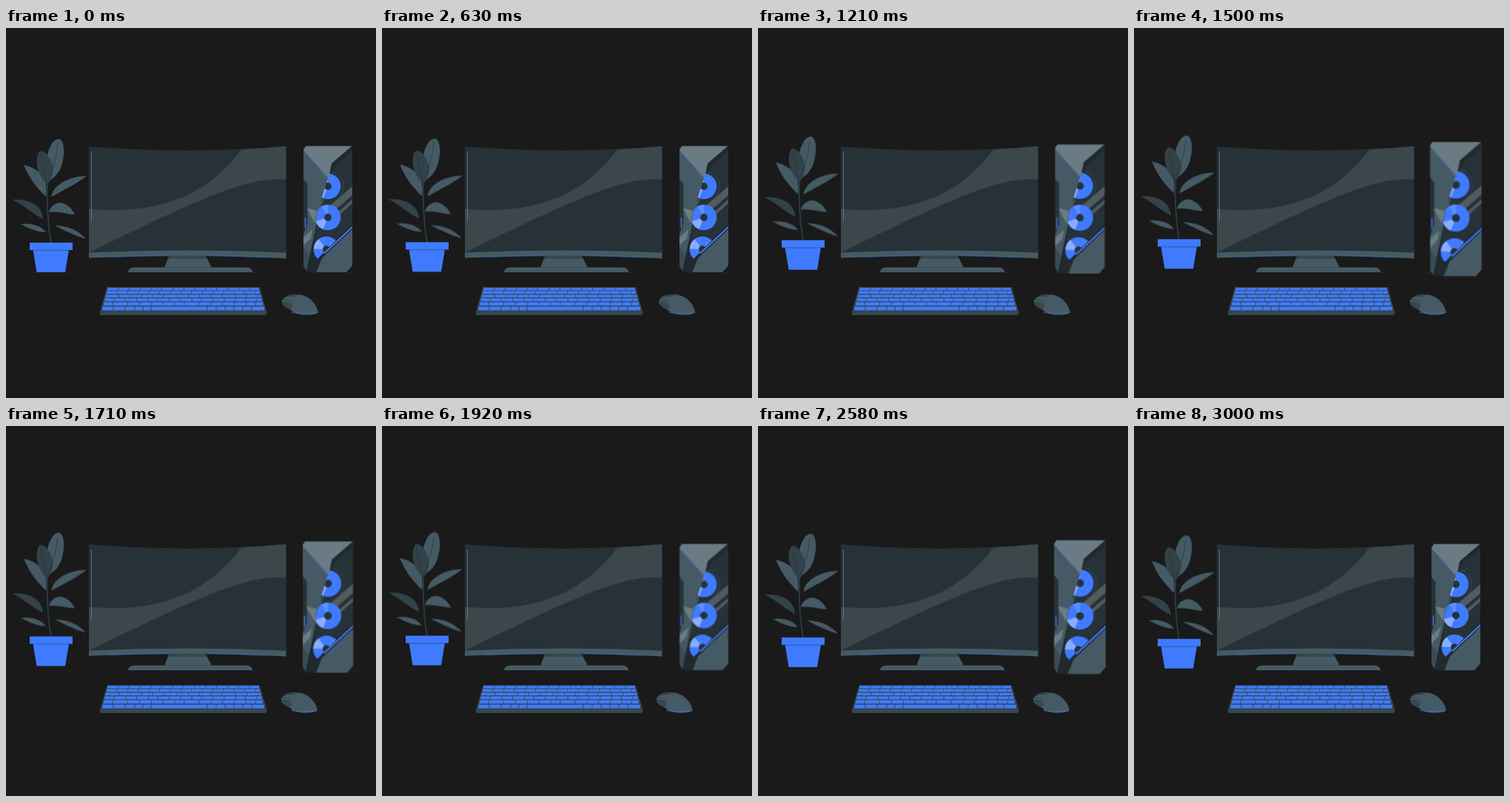
An HTML page without scripts for the animation above (3.04 s loop, 500 px wide and 500 px high).

```html
<!DOCTYPE html>
<html lang="en">
<head>
<meta charset="utf-8">
<title>Desk setup</title>
<style>
  html, body { margin: 0; width: 100%; height: 100%; overflow: hidden; background: #1a1a1a; }
  svg { display: block; width: 100vw; height: 100vh; }
  .blue { fill: #407bff; }
  .slate { fill: #455a64; }
  .mid { fill: #37474f; }
  .dark { fill: #263238; }
  .deep { fill: #20292e; }
  .glare { fill: #fff; opacity: .1; }
  .line { fill: none; stroke: #263238; stroke-width: .6; }
  .glow { fill: none; stroke: #407bff; }
  .keys path { fill: none; stroke: #407bff; }

  .plant { animation: rise 3.04s linear infinite; }
  .mouse { animation: nudge 3.04s linear infinite; }
  .tower { animation: pulse 3.04s ease-in-out infinite; transform-origin: 435px 244.7px; }

  @keyframes rise {
    0%, 16.45% { transform: translateY(0); }
    65.79% { transform: translateY(-7px); }
    100% { transform: translateY(-2.15px); }
  }
  @keyframes nudge {
    0% { transform: translateX(0); }
    18% { transform: translateX(1.6px); }
    31.6%, 49.3% { transform: translateX(0); }
    66% { transform: translateX(-2.6px); }
    98.7%, 100% { transform: translateX(0); }
  }
  @keyframes pulse {
    0%, 32.89%, 65.79%, 98.68%, 100% { transform: scale(1); }
    49.34%, 82.24% { transform: scale(1.066); }
  }
</style>
</head>
<body>
<svg viewBox="0 0 500 500" xmlns="http://www.w3.org/2000/svg">
  <defs>
    <clipPath id="glass"><path d="M439 190 470 160V266L426 309 414 318V290L418 262 424 238Z"/></clipPath>
    <clipPath id="shell"><path d="M405.500 159.500H468V321L460 330H407L402 322V164Z"/></clipPath>
    <g id="fan">
      <circle r="17.300" class="blue"/>
      <g fill="#fff">
        <path d="M0 0-16.500 5.200A17.300 17.300 0 0 0-6.500 16Z" opacity=".38"/>
        <path d="M0 0-8.600-15A17.300 17.300 0 0 1 0-17.300Z" opacity=".15"/>
      </g>
      <circle r="5" class="dark"/>
    </g>
  </defs>

  <path d="M20 330.300H480" stroke="#263238" stroke-width=".5" opacity=".7"/>

  <g class="plant">
    <path d="M61 291C57 268 55 240 56 205" fill="none" stroke="#2b3a41" stroke-width="2"/>
    <g class="slate">
      <path d="M55 208C50 186 57 153 70 150C80 148 81 176 72 193C68 200 62 205 55 208Z"/>
      <path d="M24 185C34 187 47 193 52 204C55 212 55 220 54 228C45 219 33 207 24 185Z"/>
      <path d="M109 200C92 200 76 206 67 216C63 221 61 226 62 228C77 219 92 213 109 200Z"/>
      <path d="M58 249C60 240 68 235 76 236.500C84 239 90 245 93 252C82 252 70 247 58 249Z"/>
      <path d="M20 265C32 263 46 266 54 276C42 276 31 271 20 265Z"/>
      <path d="M66 267C82 267 98 273 108 285C94 281 82 275 66 267Z"/>
    </g>
    <g fill="#324249">
      <path d="M56 211C44 203 37 178 45 167C50 163 61 175 63.500 188C64 199 60 207 56 211Z"/>
      <path d="M9 232C24 231 38 235 45 244C49 250 50 255 50 258C37 252 26 241 9 232Z"/>
    </g>
    <path class="line" d="M57 205Q68 181 70 156M55 208Q49 190 47 170"/>
    <path class="blue" d="M32 290H90V300H32ZM36.500 300H85L80 330H41.500Z"/>
    <path d="M36.500 300.300H85" stroke="#263238" stroke-width=".7" opacity=".7"/>
  </g>

  <g>
    <path class="mid" d="M221 306H269L278 324H214Z"/>
    <path class="slate" d="M219 312H271.500L278 324H214Z"/>
    <path class="slate" d="M164.500 330Q166 323.500 173 323.500H325Q332 323.500 333.500 330Z"/>
    <path class="line" d="M214 323.500H278" opacity=".6"/>
    <path class="slate" d="M112 300H378.500V311.500Q245 304 112 310.800Z"/>
    <path class="glow" stroke-width=".8" opacity=".75" d="M140 309.400Q180 308 220 307.700M272 307.700Q310 308 350 309.800"/>
    <path class="dark" d="M112 160Q245 171 378.500 159.500V303.500Q245 297.500 112 303.500Z"/>
    <path class="glare" d="M112 244.500C198 252 268 232 318 164.200Q350 162.500 378.500 159.500V205C322 199.500 244 240 112 303.500Z"/>
    <path d="M115.500 167V261" stroke="#84929a" stroke-width=".6"/>
  </g>

  <g>
    <path class="mid" d="M127 383H352.500V386Q352 388 350 388H129Q127 388 127 386Z"/>
    <path d="M136.500 350H342.500L352.500 384H127Z" fill="#34474f"/>
    <g class="keys">
      <path d="M137 352.800H342" stroke-width="3.200" stroke-dasharray="14 .8"/>
      <path d="M136 357.400H343" stroke-width="3.600" stroke-dasharray="13.600 .8"/>
      <path d="M134.500 362.200H344.500" stroke-width="3.600" stroke-dasharray="18 .8 14.200 .8 14.200 .8 14.200 .8 14.200 .8"/>
      <path d="M133.500 367.200H345.500" stroke-width="4" stroke-dasharray="12 .9 14.500 .9 14.500 .9 14.500 .9"/>
      <path d="M132 372.800H347" stroke-width="4.400" stroke-dasharray="12 .9 19 .9 15 .9 15 .9 15 .9 15 .9"/>
      <path d="M130.500 379H349" stroke-width="4.800" stroke-dasharray="14 1 15 1 12 1 10 1 10 1 75 1 11 1 11 1 11 1 11 1 11 1 20"/>
    </g>
  </g>

  <g class="mouse">
    <path class="slate" d="M373 369C375 362 384 359.500 395 360C410 361.500 420 373 421.800 384C421 387 412 388 403 387.700C393 387 387 384 384 380C379 378 373 375 373 369Z"/>
    <path class="mid" d="M373 370.500C378 368 384 371 385.500 375C386 378 385 380 384 380.500C378 378 373 375 373 370.500Z"/>
    <path class="line" d="M374 367C382 366 387 370 386 378M377 364Q388 361 396 361M382 361.500Q389 364 392 361"/>
    <path class="glow" d="M387 384.500Q402 387 421 384.500" stroke-width=".9" stroke-dasharray="4 1.500"/>
  </g>

  <g class="tower">
    <g clip-path="url(#shell)">
      <path class="dark" d="M400 158H470V332H400Z"/>
      <path class="slate" d="M400 162 436 203 424 250 415 300 407 332H400Z"/>
      <path class="glare" d="M468 214V226L440 250V238ZM468 232V237L440 262V256Z" style="opacity:.2"/>
      <path class="glare" d="M406 243 421 247 417 263ZM402 283 414 272 412 284 402 294Z" style="opacity:.2"/>
      <path class="deep" d="M466 160 440 183 436 203 424 242 418 272 405 332H418L425 312 416 309 417 290 421 264 427 228 439 198 444 186 468 166V160Z"/>
      <g clip-path="url(#glass)">
        <use href="#fan" x="435" y="214"/>
        <use href="#fan" x="435" y="256"/>
        <use href="#fan" transform="translate(433 299) rotate(70)"/>
        <path class="line" d="M440 194A21 21 0 0 1 451 228" style="stroke:#455a64"/>
      </g>
      <path class="deep" d="M468 264V274L424 316 421 312Z"/>
      <path class="slate" d="M470 270 427 311 419 332H470Z"/>
      <path class="glow" d="M468 269 430 304.500" stroke-width="2"/>
      <path d="M400 158H469L440 183 436 203 402 165Z" fill="#6a7b83"/>
      <path class="glow" d="M403 166 435 203" stroke-width=".6"/>
      <path class="dark" d="M402 204 407.500 211V265L402 279Z"/>
      <path class="glow" d="M404.500 256V270" stroke-width="1.300"/>
      <path class="dark" d="M402 296 410 306 404 332H400Z" opacity=".35"/>
    </g>
  </g>
</svg>
</body>
</html>
```
